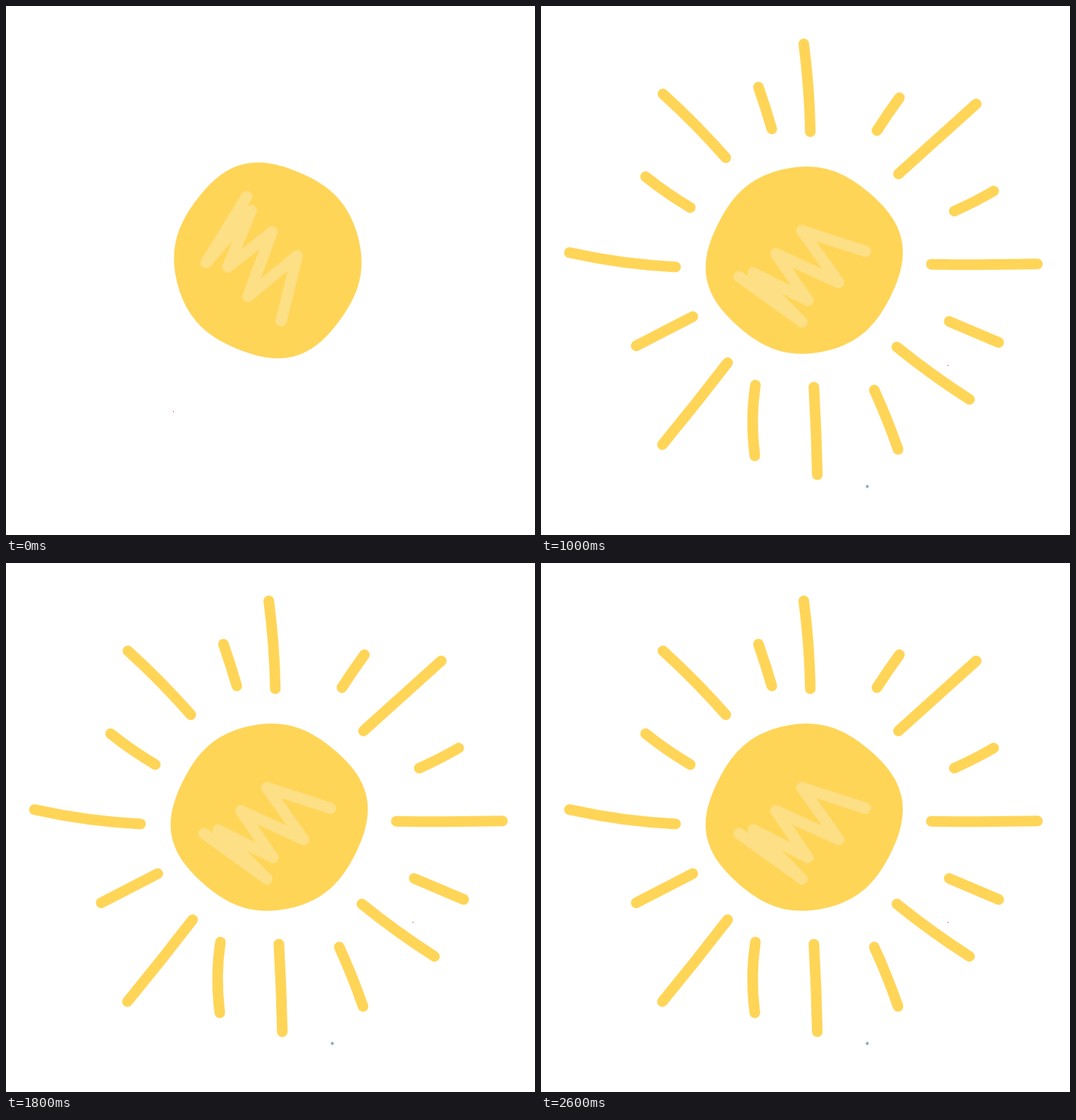
Animation of 748x748 px, one loop 2800 ms. Source, as an HTML page with a canvas:

```html
<!DOCTYPE html>
<html lang="en">
<head>
<meta charset="utf-8">
<title>Sun</title>
<style>
  html, body { margin: 0; height: 100%; overflow: hidden; background: #fff; }
  canvas { display: block; width: 100vw; height: 100vh; }
</style>
</head>
<body>
<canvas id="stage" width="748" height="748"></canvas>
<script>
const STEP = 200, STEPS = 14, RAYS = 16;
const YELLOW = "#ffd558", SHINE = "#fddf85";
const ctx = document.getElementById("stage").getContext("2d");
ctx.lineCap = ctx.lineJoin = "round";

// Degrees: the opening pose, then a cycle that slows as it turns
const opening = 48.5, cycle = [47, 0, -22.7, -37.3];

// Hand-drawn wobble: tip bearing of each ray and how far its foot leans from it
const bearings = [-4.7, 17.5, 38.4, 60.3, 77.4, 100.8, 123.6, 141.2, 164.6, 190, 219, 245, 267, 292.7, 307.4, 338];
const leans = [0, 2, 1, 0, 3, -2, -1, 7, -1, 0, -5, -3, 3, 1, 3, -1];
const zigzag = [[-87, -36], [-55, 69], [-68, -28], [-30, 50], [-26, -30], [20, 56], [23, -34], [77, 44]];

const rad = deg => deg * Math.PI / 180;
const wave = deg => Math.cos(rad(deg));
const polar = (deg, r) => [r * wave(deg), r * Math.sin(rad(deg))];

function dot(x, y, r, color) {
  ctx.fillStyle = color;
  ctx.beginPath();
  ctx.arc(x, y, r, 0, 2 * Math.PI);
  ctx.fill();
}

function stroke(color, width) {
  ctx.strokeStyle = color;
  ctx.lineWidth = width;
  ctx.stroke();
}

// A round blob with two soft, opposite corners
function drawDisc() {
  ctx.beginPath();
  for (let a = 0; a < 360; a += 3) {
    const off = a - 26;
    const r = 134 + 1.6 * wave(a - 75) + 3 * wave(2 * off) + 2.2 * wave(4 * off) + 1.3 * wave(6 * off);
    ctx.lineTo(...polar(a, r));
  }
  ctx.fillStyle = YELLOW;
  ctx.fill();

  ctx.beginPath();
  zigzag.forEach(p => ctx.lineTo(...p));
  stroke(SHINE, 16);
}

// Long and short rays alternate
function drawRays() {
  ctx.beginPath();
  for (let i = 0; i < RAYS; i++) {
    const turn = i * 360 / RAYS, long = i % 2 === 0;
    const inner = long ? 181 : 200 + 26 * wave(turn - 45);
    const outer = long ? 318 + 17 * wave(2 * turn - 50) : 276 + 26 * wave(turn - 90);
    const tip = bearings[i], lean = leans[i];
    ctx.moveTo(...polar(tip + lean, inner));
    ctx.quadraticCurveTo(...polar(tip + lean * 0.65, (inner + outer) / 2), ...polar(tip, outer));
  }
  stroke(YELLOW, 15);
  dot(-122.5, 310, 2.2, "#8fb0c4");
}

function draw() {
  const step = Math.floor(performance.now() / STEP) % STEPS;
  const angle = step < 2 ? opening : cycle[(step - 2) % cycle.length];
  ctx.clearRect(0, 0, 748, 748);
  ctx.save();
  ctx.translate(371, 358.5);
  ctx.rotate(rad(angle));
  drawDisc();
  dot(72, 243, 0.8, "#d4607a");
  if (step > 0) drawRays();
  ctx.restore();
  requestAnimationFrame(draw);
}
draw();
</script>
</body>
</html>
```
